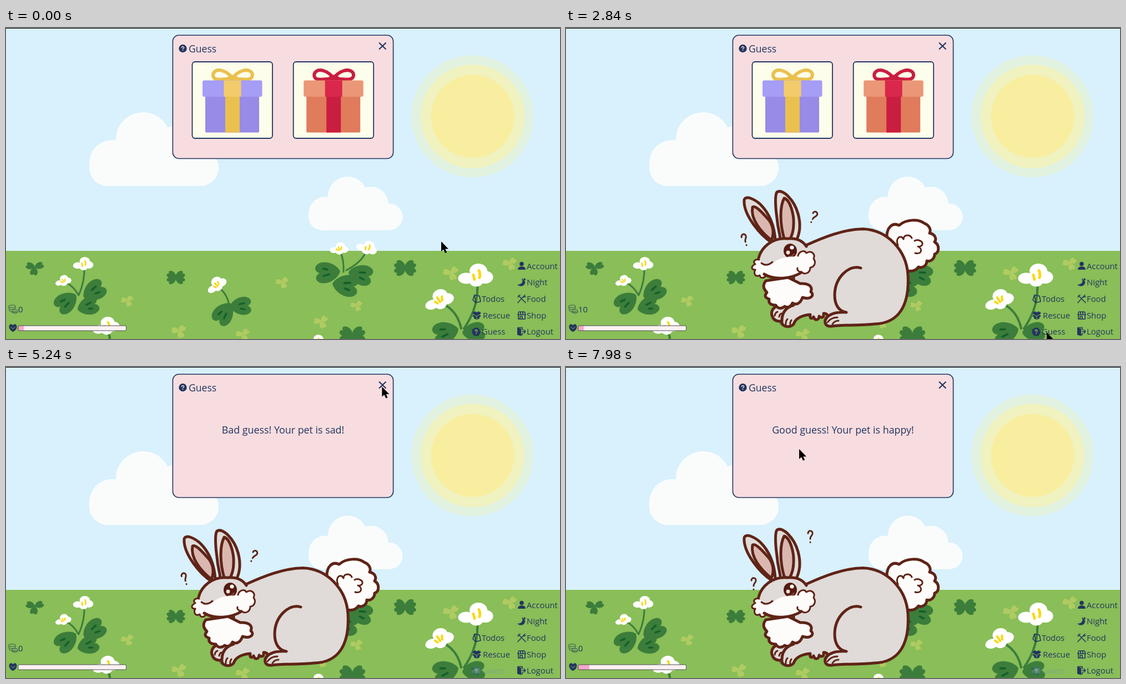
Write an HTML page that moves like this. It is 998x561 px and loops after 8 s.

```html
<!DOCTYPE html>
<html lang="en">
<head>
<meta charset="utf-8">
<title>Pet meadow</title>
<style>
html, body { margin: 0; width: 100%; height: 100%; overflow: hidden; background: #d8f1fc; }
svg { display: block; width: 100%; height: 100%; font-family: "Open Sans", "Noto Sans", sans-serif; }
.ink { fill: none; stroke: #5f2317; stroke-width: 5; stroke-linecap: round; stroke-linejoin: round; }
.thin { stroke-width: 3; }
.fur { fill: #e0dbd8; }
.white { fill: #fefcfa; }
.pink { fill: #dab8b0; }
.line { fill: none; stroke: #22355f; stroke-width: 1.6; stroke-linecap: round; stroke-linejoin: round; }
</style>
</head>
<body>
<svg id="stage" viewBox="0 0 998 561" preserveAspectRatio="none"></svg>
<script>
const NAVY = '#22355f', DARK = '#3c7d3b', LIGHT = '#b0cb62';
const HEART = 'M0 0C-7-2-13-11-9-17C-6-21-1-19 0-16C1-19 6-21 9-17C13-11 7-2 0 0Z';
const at = (x, y, body, more = '') => `<g transform="translate(${x} ${y}) ${more}">${body}</g>`;
const path = (d, attrs) => `<path d="${d}" ${attrs}/>`;
const ink = (d, cls = '') => path(d, `class="ink ${cls}"`);
const label = (x, y, text, size = 14.8, more = '') =>
  `<text x="${x}" y="${y}" font-size="${size}" fill="${NAVY}" ${more}>${text}</text>`;

// Meadow
const clover = (x, y, w, color, turns) =>
  at(x, y, turns.map(a => path(HEART, `fill="${color}" transform="rotate(${a}) scale(.8 1)"`)).join(''),
    `scale(${w / 45} ${w / 52})`);
const dark = (x, y, w, turns = [-56, 56, 124, -124]) => clover(x, y, w, DARK, turns);
const light = (x, y, w) => clover(x, y, w, LIGHT, [-78, 42, 160]);
const leaf = (x, y, turn, s) =>
  at(x, y, path(HEART, `fill="${DARK}"`) +
    path('M-2-9L-3-13M3-10L4-13', 'stroke="#14602a" stroke-width="2" stroke-linecap="round"'),
    `rotate(${turn}) scale(${s * .8} ${s})`);
const stem = (d, w = 3) => path(d, `fill="none" stroke="${DARK}" stroke-width="${w}" stroke-linecap="round"`);
const PAIR = 'M-4-1L-2 7M6-9Q9-2 7 4', TRIO = 'M-9 1L-5 6M-2-6L1 5M8-5L6 3';
const flower = (x, y, w, turn = 0, marks = PAIR) => at(x, y, `<g fill="#fff">
  <ellipse cx="5" cy="-8" rx="16" ry="13.5"/><ellipse cx="-17" cy="5" rx="14.5" ry="10"/>
  <ellipse cx="17" cy="3" rx="14.5" ry="11.5"/><ellipse cx="1" cy="9" rx="13" ry="11"/></g>` +
  path(marks, 'fill="none" stroke="#f7d91c" stroke-width="5" stroke-linecap="round"'),
  `rotate(${turn}) scale(${w / 62})`);

const cloud = `<g fill="#fafcfc"><rect x="150" y="219" width="233" height="66" rx="33"/>
  <circle cx="191.5" cy="243.5" r="41.5"/><circle cx="247" cy="201" r="49"/>
  <circle cx="305" cy="219.5" r="42.5"/><rect x="191" y="210" width="156" height="70"/></g>`;

const scenery = `<rect width="998" height="561" fill="#d8f1fc"/>
  <circle cx="840" cy="159.5" r="110" fill="#e2f2e0"/>
  <circle cx="840.5" cy="159.5" r="93.5" fill="#f0f2bf"/>
  <circle cx="840.5" cy="159.5" r="75" fill="#f9ee9f"/>
  ${cloud}<g transform="translate(436 157.5) scale(.727)">${cloud}</g>
  <rect y="402" width="998" height="159" fill="#89be58"/>` +
  dark(52, 432, 38, [-70, 65, 190]) + dark(306, 450, 40) + dark(719, 433, 48) + dark(624, 555, 56) +
  light(219, 492, 28) + light(498, 459, 29) + light(632, 501, 27) + light(568, 530, 32) +
  light(312, 547, 33) + light(427, 553, 31) + light(802, 442, 35) + light(908, 425, 32) +
  stem('M131 482C138 466 142 450 141 432') + stem('M130 481C125 472 118 464 108 459') +
  leaf(140, 486, 58, 2.2) + leaf(126, 481, -128, 2.2) + leaf(129, 508, 72, 2) +
  flower(139, 425.5, 36) + flower(103, 456, 29, -12, TRIO) +
  stem('M402 499C400 488 394 476 385 470') + leaf(403, 502, 88, 2) + leaf(405, 497, -145, 2.2) +
  flower(379, 463, 38, -32, TRIO) +
  stem('M608 440C609 425 606 412 602 402') + stem('M613 437C632 427 645 415 649 401') +
  leaf(602, 439, -95, 2.3) + leaf(617, 440, 103, 2.25) + leaf(588, 461, 98, 2.4) +
  flower(600, 398, 33, 0, TRIO) + flower(650, 396, 38, 18) +
  stem('M825 542C842 518 851 490 849 460', 4) + stem('M820 542C816 524 808 510 793 501', 4) +
  leaf(815, 543, -105, 2.4) + leaf(822, 550, 85, 2.1) +
  flower(846, 446.5, 62) + flower(780, 490.5, 53, -18, TRIO) +
  stem('M180 545Q188 553 187 564', 4) + flower(180, 538, 48, -8) + flower(560, 565, 34);

// Rabbit
const eye = (x, y) => at(x, y, `<ellipse rx="12" ry="13" fill="#54190f"/>
  <circle cx="3" cy="-6" r="3.6" fill="#fff"/><circle cx="-4" cy="3" r="3.4" fill="#f3e3dc"/>
  <path d="M-4 10Q3 12 7 5" fill="none" stroke="#8e5647" stroke-width="2"/>`);
const torso =
  ink('M578 376C578 360 588 350 600 356C612 345 635 344 645 352C655 356 658 364 655 370C665 372 668 380 664 386C674 392 672 406 664 408C664 418 655 422 650 420C650 430 640 434 635 431C628 441 615 440 606 434Z', 'white') +
  ink('M598 392C593 380 602 371 608 381C608 372 620 372 623 379M628 384C634 380 643 385 642 390C641 394 636 395 634 394C643 398 641 409 629 406', 'thin') +
  ink('M385 501C372 502 368 513 372 521C375 529 384 530 390 528L398 503Z', 'fur') +
  ink('M410 402L432 392C465 377 500 363 535 362.5C578 364 613 400 616 445C619 500 600 533 555 534C525 537 500 535 478 538C466 539 464 529 470 522C474 518 468 514 464 515C465 522 461 524 456 520C455 528 448 528 446 521C442 526 439 524 440 517C425 518 414 524 411 532C408 541 390 541 389 531C388 514 396 504 410 500Z', 'fur') +
  ink('M531 433C510 426 484 450 484 482C484 500 492 511 505 513C490 512 476 515 469 523') +
  ink('M471 531C476 524 483 522 489 522M480 534Q484 528 491 528M396 537Q395 529 399 525M404 537Q403 531 406 527M376 519Q377 513 381 512M384 521Q385 516 388 515', 'thin') +
  ink('M360 456C352 466 358 473 362 477C356 484 360 487 366 489C364 497 370 500 378 500C382 508 390 506 394 502C400 506 406 502 408 496C414 500 422 498 426 486C442 491 448 481 441 476C445 466 437 460 422 461L400 450Z', 'white');

const idle = ink('M394 388C400 370 425 362 440 350C455 340 466 328 473 333C483 341 472 358 462 362C446 371 425 384 410 391', 'fur') +
  path('M353 446C350 420 370 391 400 391C425 393 440 410 440 430L440 452C420 464 390 464 370 458Z', 'class="fur"') +
  path('M353 446C372 444 382 440 394 442C410 442 419 438 419 429C424 422 431 424 432 430C442 429 444 436 438 440C444 446 437 453 431 449C425 460 400 464 385 461C370 460 358 455 353 446Z', 'class="white"') +
  ink('M412 395C405 391 400 391 394 391C374 394 357 413 353 437C350 444 350 450 358 452C370 461 395 464 420 461') +
  ink('M354 447C362 451 367 450 370 446M420 431C420 424 430 424 431 430C439 428 445 434 438 439C446 445 438 452 432 448C430 452 424 453 421 449', 'thin') +
  eye(405, 428) +
  ink('M408 396C430 377 470 373 507 353C512 355 508 368 504 376C494 391 478 400 455 402C440 405 426 406 424 398Z', 'fur') +
  ink('M424 396C428 384 460 380 478 374C490 370 500 366 503 369C500 384 480 398 460 401C445 404 422 408 424 396Z', 'pink');

const ears = ink('M371 385C350 372 319 335 321 308C324 299 340 307 350 316C366 332 375 352 377 380', 'fur') +
  ink('M370 381C350 365 332 342 336 321C342 317 356 334 366 345C374 356 375 370 370 381Z', 'pink') +
  ink('M386 377C380 350 374 303 380 294C390 287 411 308 418 333C424 355 420 372 414 383', 'fur') +
  ink('M393 378C385 350 385 320 393 305C404 308 411 335 410 352C410 366 406 375 402 382Z', 'pink');
const mark = ink('M-4-6C-4-12 5-12 4-5C3-1 0-1 0 4M0 10V10.2', 'thin');
const curious = `<g id="ears">${ears}</g>` +
  path('M347 416C352 395 372 378 398 380C420 379 432 390 434 400L424 442C400 454 370 450 350 440Z', 'class="fur"') +
  eye(404, 402) +
  path('M348 418C340 416 336 422 341 426C332 430 334 437 341 436C337 444 342 450 349 446C352 452 357 452 360 446C382 456 405 453 424 441C432 446 440 442 440 432C446 432 452 424 446 416C450 408 442 400 433 406C430 400 420 402 418 411C402 414 396 411 380 419C365 430 355 428 348 418Z', 'class="white"') +
  ink('M347 415C352 395 372 378 398 380C418 378 428 386 433 394M357 444C375 455 405 453 424 441') +
  ink('M348 418C340 416 336 422 341 426C332 430 334 437 341 436C337 444 342 450 349 446C350 452 356 452 360 447M352 424C358 429 365 428 372 422M418 411C420 402 430 400 433 406C442 400 450 408 446 416C452 424 446 432 440 432C440 442 430 446 424 440C419 440 416 437 417 433', 'thin') +
  `<g id="mark1">${mark}</g><g id="mark2">${mark}</g>`;

// Interface
const help = (x, y, r, bg) => at(x, y, `<circle r="${r}" fill="${NAVY}"/>
  <path d="M-2-1.5C-2-4.5 2.5-4 2-1.2C1.8 0 0 0 0 1.3M0 3.5V3.8" fill="none" stroke="${bg}" stroke-width="1.4" stroke-linecap="round"/>`);
const line = d => path(d, 'class="line"');
const solid = d => path(d, `fill="${NAVY}"`);
const menu = [
  [929, 429, 'Account', '<circle cy="-3.5" r="3.8" fill="#22355f"/>' + solid('M-7 7C-7-1 7-1 7 7Z')],
  [929, 458.5, 'Night', solid('M0-7C4 0-1 5-8 4C-3 10 7 7 6-1C5-4 3-6 0-7ZM5-8l1 2 2 1-2 1-1 2-1-2-2-1 2-1Z')],
  [848, 488.5, 'Todos', line('M-4-7L5-5L7 5L-2 7L-7 2ZM-4-7L-2 7M-7 2L-4-7')],
  [929, 488.5, 'Food', line('M-6-6L7 7M6-7L-7 7M-7-3L-3-7M3-3L7-4')],
  [848, 518, 'Rescue', solid('M-8-4L-3-7L0-5L3-7L8-4L5-1L8 2L5 3V6L0 8L-5 6V3L-8 2L-5-1Z') + path('M-5-1L0 2L5-1M0 2V7', 'fill="none" stroke="#89be58"')],
  [929, 518, 'Shop', line('M-6 0V7H6V0M-7-1L-5-6H5L7-1ZM-2-6V-1M2-6V-1M-3 7V2H1V7')],
  [928, 547.5, 'Logout', solid('M-7-7L0-5V8L-7 6Z') + line('M-6-7H2V-3M2 3V6H0M2 0H8M5-3L8 0L5 3')]
].map(([x, y, text, icon]) => at(x, y, icon) +
  label(text === 'Rescue' ? 859 : x < 900 ? 857 : 938, y + 5.5, text)).join('');

const status = `<g fill="none" stroke="#4b6f55" stroke-width="1.3"><ellipse cx="11" cy="502" rx="6" ry="2.3"/>
  <path d="M5 503v3q6 4 12 0v-3M6 507v3q6 4 11 1"/><ellipse cx="16" cy="510" rx="5" ry="2.2"/><path d="M11 511v2q5 3 10 0v-2"/></g>` +
  label(22, 512.7, '0', 14.8, 'id="coins"') +
  at(12.5, 548, path(HEART, `fill="${NAVY}" transform="scale(.68 .72)"`) +
    path('M-4-9L0-5L4-9', 'fill="none" stroke="#89be58"')) +
  `<rect x="22" y="537" width="194.5" height="9" rx="2" fill="#fcf2f3"/>
  <rect id="health" x="22" y="537" height="9" rx="1.5" fill="#f5a8c9"/>
  <rect x="22" y="537" width="194.5" height="9" rx="2" fill="none" stroke="#4d4a55"/>`;

const gift = (x, id, lid, box, bright, ribbon) => at(x, 0,
  `<rect id="${id}" x="335.5" y="61" width="144.5" height="138" rx="5" fill="#fcfdea" stroke-width="1.8"/>
  <g fill="none" stroke="${ribbon}" stroke-width="6"><path d="M408 90C396 76 383 74 377 78C370 83 373 92 380 92.5C390 93 400 92 408 90Z"/>
  <path d="M408 90C420 76 433 74 440 78C447 83 444 92 436 92.5C427 93 417 92 408 90Z"/></g>
  <ellipse cx="408.5" cy="91" rx="10" ry="6.5" fill="${ribbon}"/>
  <rect x="359" y="122" width="97" height="66.5" rx="2" fill="${box}"/>
  <rect x="395" y="122" width="26" height="66.5" fill="${ribbon}"/>
  <rect x="354" y="94.5" width="107.5" height="29.5" rx="3" fill="${lid}"/>
  <rect x="392.5" y="94.5" width="31" height="29.5" fill="${bright}"/>`);

const popup = `<g id="popup"><rect x="300.4" y="13" width="397.2" height="222.5" rx="11" fill="#f8dde0" stroke="${NAVY}" stroke-width="1.6"/>` +
  help(318.5, 37, 7.2, '#f8dde0') + label(329, 44.3, 'Guess', 17.6) +
  path('M672 26.5L684.5 38.5M684.5 26.5L672 38.5', `stroke="${NAVY}" stroke-width="2.2"`) +
  `<g id="gifts">${gift(0, 'giftA', '#a59df6', '#978be7', '#f3cb6b', '#eac04f')}
  ${gift(182.2, 'giftB', '#eb9777', '#e07b5b', '#da274c', '#c91e40')}
  <rect id="scroll" x="675" y="62" width="5" height="133" rx="2.5" fill="#c9b2bd"/></g>` +
  label(499, 119.5, '', 17.85, 'id="message" text-anchor="middle"') + '</g>';

const cursors = `<g id="cursor">
  <path id="arrow" d="M0 0V18L4 14.5L7.2 21L10.2 19.5L7.3 13.5H13Z"/>
  <path id="hand" d="M-2-10C-2-13 1-13 1-10V-3L8-1C11 0 10 4 9 7L8 12H-2L-8 4C-10 1-7-1-5 1L-2 4Z"/>
  <g id="blocked" fill="none" stroke="#000" stroke-width="3"><circle r="6.5"/><path d="M-4.5-4.5L4.5 4.5"/></g></g>`;

document.getElementById('stage').innerHTML = scenery +
  `<g id="rabbit">${torso}<g id="idle">${idle}</g><g id="curious">${curious}</g></g>` +
  status + menu + `<g id="guess">${help(847, 548, 7.5, '#89be58')}${label(857, 553, 'Guess')}</g>` +
  popup + cursors + '<rect width="998" height="1"/>';

// Motion
const $ = id => document.getElementById(id);
const show = (id, on) => $(id).setAttribute('display', on ? 'inline' : 'none');
const place = (id, x, y, turn = 0) => $(id).setAttribute('transform', `translate(${x} ${y}) rotate(${turn})`);
const scenes = [
  [0, 'gifts'], [560, "Congratulations! Here's some coins!"], [1440, ''],
  [2780, 'gifts'], [4500, 'Bad guess! Your pet is sad!'], [5500, ''],
  [6700, 'gifts'], [7660, 'Good guess! Your pet is happy!']
];
const route = [
  [0, 784, 385], [420, 592, 160], [600, 590, 158], [880, 726, 90], [1260, 680, 34], [1430, 678, 33],
  [1520, 675, 44], [1700, 676, 52], [2360, 862, 553], [2840, 866, 549], [3300, 866, 549],
  [3950, 600, 188], [4280, 587, 178], [4560, 587, 178], [5300, 679, 33], [5500, 679, 33],
  [5760, 692, 139], [6080, 864, 558], [6720, 864, 558], [7300, 410, 152], [7700, 410, 150], [7980, 420, 148]
];

function pointer(t) {
  const i = route.findIndex(p => p[0] > t);
  if (i < 0) return route[route.length - 1].slice(1);
  const [t0, x0, y0] = route[i - 1], [t1, x1, y1] = route[i];
  const u = (t - t0) / (t1 - t0), k = u * u * (3 - 2 * u);
  return [x0 + (x1 - x0) * k, y0 + (y1 - y0) * k];
}

function draw(t) {
  const scene = scenes.filter(s => s[0] <= t).pop()[1];
  const choosing = scene === 'gifts';
  const disabled = t >= 560 && t < 2500 || t >= 4500 && t < 6480 || t >= 7660;
  const [x, y] = pointer(t);
  const inPopup = x > 300 && x < 698 && y > 13 && y < 236;
  const over = left => choosing && x > left && x < left + 145 && y > 61 && y < 199;
  const overA = over(335), overB = over(518);
  const blocked = disabled && x > 838 && x < 900 && y > 538;

  show('popup', scene);
  show('gifts', choosing);
  show('scroll', choosing && inPopup);
  $('message').textContent = choosing ? '' : scene;
  $('giftA').setAttribute('stroke', overA ? '#3280ad' : NAVY);
  $('giftB').setAttribute('stroke', overB ? '#3280ad' : NAVY);

  const alt = Math.floor(t / 300) % 2;
  show('rabbit', t >= 100);
  show('idle', !scene);
  show('curious', scene);
  place('ears', 0, alt * 2);
  place('mark1', alt ? 322 : 338, alt ? 382 : 391, alt ? -18 : 0);
  place('mark2', alt ? 446 : 440, alt ? 341 : 306, alt ? 25 : 0);

  $('coins').textContent = t >= 560 && t < 4500 ? '10' : '0';
  $('health').setAttribute('width', t < 4500 ? 10 : t < 7660 ? 0 : 20);
  $('guess').setAttribute('opacity', disabled ? .4 : 1);
  $('guess').style.filter = disabled ? 'grayscale(.5) brightness(2.6)' : 'none';

  place('cursor', x, y);
  show('hand', overA || overB);
  show('blocked', blocked);
  show('arrow', !overA && !overB && !blocked);
}

const start = performance.now();
function tick(now) {
  draw(Math.max(0, now - start) % 8000);
  requestAnimationFrame(tick);
}
draw(0);
requestAnimationFrame(tick);
</script>
</body>
</html>
```
